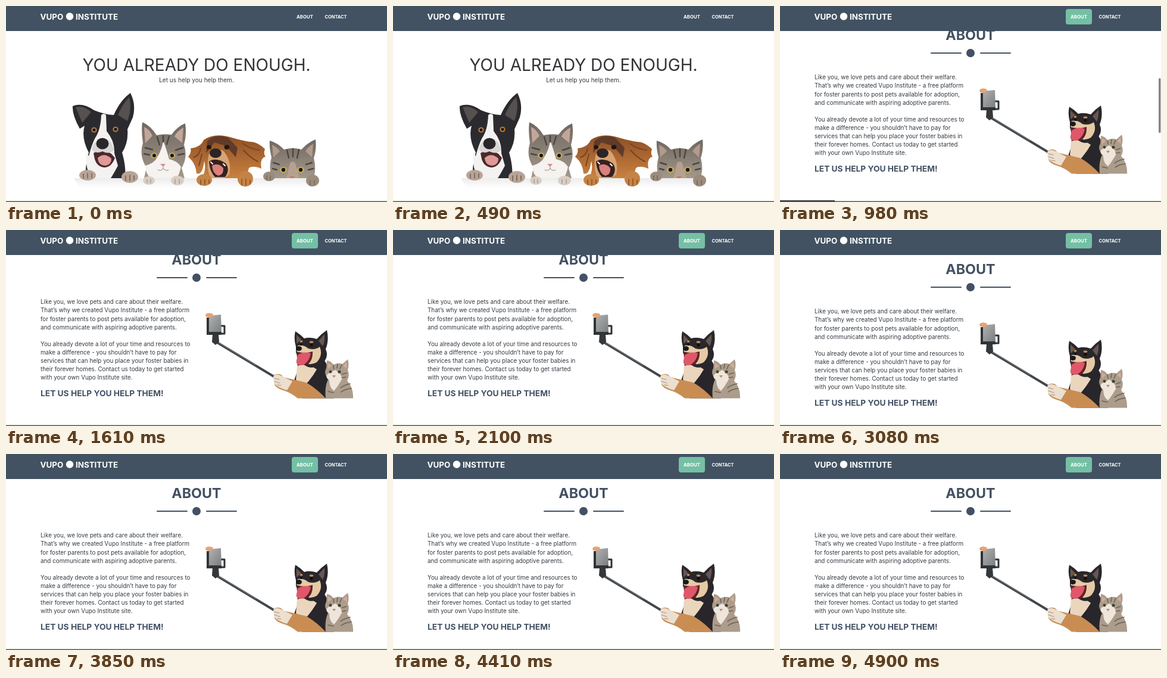
Animation, 640 px wide and 329 px high, one loop 4.97 s. Source, as an HTML page:

```html
<!DOCTYPE html>
<html lang="en">
<head>
<meta charset="utf-8">
<title>Pet adoption page</title>
<style>
  html, body { margin: 0; width: 100%; height: 100%; overflow: hidden; background: #fff; }
  svg { display: block; width: 640px; height: 329px; font-family: Inter, "Open Sans", sans-serif; font-optical-sizing: none; }
  .mid { text-anchor: middle; }
  .bold { font-weight: 700; }
  .slate { fill: #425163; }
  .copy { font-size: 9.85px; fill: #343a40; }
  .line { fill: none; stroke-linecap: round; stroke-linejoin: round; }
</style>
</head>
<body>
<svg viewBox="0 0 640 329">
  <defs>
    <linearGradient id="shelf" x2="0" y2="1">
      <stop stop-color="#ececec"/><stop offset="1" stop-color="#fff"/>
    </linearGradient>
    <linearGradient id="tabby" x2="0" y2="1">
      <stop stop-color="#6f675f"/><stop offset="1" stop-color="#a3988c"/>
    </linearGradient>
    <linearGradient id="gold" x2="0" y2="1">
      <stop stop-color="#8d4f25"/><stop offset="1" stop-color="#c9813f"/>
    </linearGradient>
    <linearGradient id="phone" x2="1" y2="1">
      <stop stop-color="#b4b5b5"/><stop offset="1" stop-color="#777a7c"/>
    </linearGradient>
  </defs>

  <g id="hero">
    <text class="mid" x="320" y="109" font-size="28" fill="#333437">YOU ALREADY DO ENOUGH.</text>
    <text class="mid" x="320" y="127.5" font-size="10.1" fill="#343a40">Let us help you help them.</text>
    <path d="M114 289H522L518 306H124Z" fill="url(#shelf)"/>

    <g id="collie">
      <path d="M133 289Q134 262 139 246Q126 221 132 201L124 206Q111 183 112 168Q128 161 148 175Q165 182 181 183Q192 158 209 146Q219 166 213 187L204 207Q206 229 195 246Q202 270 200 289Z" fill="#2b2b2f"/>
      <path d="M117 170Q130 166 143 178L128 196ZM188 183Q196 164 207 153Q212 172 204 193Z" fill="#56504f"/>
      <path d="M160 183Q164 179 168 183L169 210Q183 227 182 247L188 268Q180 283 176 289H146Q132 277 135 244L139 252Q144 232 150 221Q159 208 160 183Z" fill="#f4f2f1"/>
      <path d="M147 247Q160 238 177 248L183 255Q177 271 165 271Q153 270 149 257Z" fill="#4a2a2b"/>
      <path d="M154 255Q165 245 177 256Q177 267 166 268Q155 267 154 255Z" fill="#df9a98"/>
      <path d="M144 241Q151 249 162 244Q174 250 181 242Q178 222 163 223Q148 223 144 241Z" fill="#d9d6d5"/>
      <ellipse cx="162" cy="231" rx="10.5" ry="9.5" fill="#29272a"/>
      <g fill="#b87a40"><circle cx="148" cy="208" r="4.6"/><circle cx="184" cy="207" r="4.6"/></g>
      <g fill="#141414"><circle cx="148" cy="208" r="2.5"/><circle cx="184" cy="207" r="2.5"/></g>
      <g fill="#b8a497"><ellipse cx="137" cy="284" rx="14" ry="9"/><ellipse cx="208" cy="287" rx="14" ry="10"/></g>
      <path class="line" d="M130 282v7m7-8v8m7-8v7M201 285v8m7-9v9m7-8v7" stroke="#715d52" stroke-width="1.5"/>
    </g>

    <g id="whitecat">
      <path d="M232 289L236 271Q223 252 230 230Q227 210 229 195Q243 201 253 217Q264 214 278 216Q288 202 301 197Q304 216 299 233Q306 253 295 272L300 289Z" fill="url(#tabby)"/>
      <path d="M232 203Q242 208 246 218L234 230ZM298 204Q287 210 283 219L296 230Z" fill="#c3a69b"/>
      <path d="M264 225Q269 239 274 257Q288 260 294 270Q291 284 286 289H243Q234 281 234 268Q249 264 254 254Q263 239 264 225Z" fill="#f5f2ef"/>
      <path class="line" d="M254 220l4 13m6-15v10m10-9l-4 13M234 238l12 3m-14 7l9 2M297 238l-12 4m14 6l-10 2" stroke="#494540" stroke-width="2.4"/>
      <g fill="#c6a55c"><ellipse cx="249" cy="251" rx="5.5" ry="5"/><ellipse cx="279" cy="251" rx="5.5" ry="5"/></g>
      <g fill="#171717"><circle cx="249" cy="251" r="3"/><circle cx="279" cy="251" r="3"/></g>
      <path d="M259 265h9l-4 5Z" fill="#d48e88"/>
      <path class="line" d="M264 270v3q-5 5-9 2m9-2q5 5 9 2" stroke="#958680"/>
      <g fill="#d9cec4"><ellipse cx="240" cy="293" rx="10" ry="7"/><ellipse cx="288" cy="293" rx="11" ry="8"/></g>
      <path class="line" d="M237 291v6m6-6v6M284 291v7m7-7v7" stroke="#8f8175"/>
    </g>

    <g id="spaniel">
      <path d="M329 289Q337 275 333 260Q330 285 320 281Q319 264 306 253Q312 246 310 239Q327 237 332 225Q351 211 383 222Q398 226 410 228Q421 227 435 240Q432 249 436 253Q426 255 429 273Q414 267 408 272L403 289Z" fill="url(#gold)"/>
      <path d="M338 227Q351 214 373 221L389 238L386 254L370 235L350 229L336 247Z" fill="#603b28"/>
      <path d="M341 248Q351 235 366 244Q380 262 375 283L367 289H344Q335 273 341 248Z" fill="#d8a474"/>
      <path d="M341 261Q352 253 369 264Q377 275 368 287H351Q342 277 341 261Z" fill="#38201f"/>
      <path d="M346 268Q356 262 365 272Q366 283 357 285Q347 282 346 268Z" fill="#d9817c"/>
      <path class="line" d="M344 262l3 3m18 0l3 3" stroke="#fff" stroke-width="2"/>
      <ellipse cx="352" cy="247" rx="10" ry="8" fill="#2b2527"/>
      <g fill="#24160f"><ellipse cx="341" cy="237" rx="4" ry="3.5"/><ellipse cx="371" cy="237" rx="4.4" ry="3.8"/></g>
      <path class="line" d="M398 231q12 9 28 11m-27 0q10 12 24 19M327 239q-2 12-12 15m14-5l-5 19" stroke="#7c431f" stroke-width="2"/>
      <g fill="#c48346"><ellipse cx="333" cy="292" rx="13" ry="10"/><ellipse cx="402" cy="290" rx="13" ry="13"/></g>
      <path class="line" d="M327 292v8m7-9v9m7-8v6M396 291v10m7-11v11m7-9v7" stroke="#7d4720" stroke-width="1.3"/>
    </g>

    <g id="greycat">
      <path d="M446 289Q441 270 446 254Q442 239 443 226Q457 230 467 241Q482 236 496 241Q507 229 520 224Q522 241 517 255Q522 275 516 289Z" fill="url(#tabby)"/>
      <path d="M447 233Q456 237 460 244L449 254ZM516 231Q507 237 503 244L514 254Z" fill="#b29a8d"/>
      <path class="line" d="M472 242l3 13m7-15v13m10-12l-3 14M449 263l10 3m-11 7l7 2M514 263l-10 3m12 7l-8 2" stroke="#4b463f" stroke-width="2.4"/>
      <path d="M477 264Q482 258 486 264L493 289H471Z" fill="#b6a18e"/>
      <g fill="#c9a955"><ellipse cx="466" cy="275" rx="6" ry="5.3"/><ellipse cx="495" cy="275" rx="6" ry="5.3"/></g>
      <g fill="#161616"><circle cx="466" cy="275" r="3.2"/><circle cx="495" cy="275" r="3.2"/></g>
      <path d="M476 286h9l-3 3h-3Z" fill="#b8776a"/>
      <g fill="#9c8b7b"><ellipse cx="442" cy="286" rx="10" ry="8"/><ellipse cx="515" cy="293" rx="11" ry="10"/></g>
      <path class="line" d="M438 285v7m6-7v7M511 293v8m7-8v7" stroke="#5f544b"/>
    </g>
  </g>

  <g id="about">
    <text class="mid bold slate" x="320" y="74.3" font-size="23.3">ABOUT</text>
    <path class="line" d="M254 96H304M337 96H387" stroke="#425163" stroke-width="2"/>
    <circle class="slate" cx="320" cy="96" r="7"/>
    <g id="copy" class="copy"></g>
    <text class="bold slate" x="58" y="294.5" font-size="13.75">LET US HELP YOU HELP THEM!</text>

    <g id="selfie">
      <path class="line" d="M355 205L450 262" stroke="#42474c" stroke-width="4"/>
      <path class="line" d="M357 205L420 243" stroke="#777c80"/>
      <path d="M347 191H357L358 204L352 209L346 204Z" fill="#34383b"/>
      <path class="line" d="M360 177h7v13h-7" stroke="#2e3234" stroke-width="3"/>
      <path d="M340 160L361 158L362 190L338 191Z" fill="url(#phone)"/>
      <path d="M337 163H341V187H362V192H337Z" fill="#303437"/>
      <path d="M335 158Q339 153 348 157L346 162H336Z" fill="#e8a271"/>

      <path d="M498 298.500Q487 290 479 283L490 251Q488 239 494 225L524 223Q549 243 551 298.500Z" fill="#28262a"/>
      <path d="M489 244Q506 238 522 250Q513 266 499 280L487 267Z" fill="#ead6bd"/>
      <path d="M451 259Q461 255 466 263L504 272Q520 281 537 298.500H490Q477 288 465 285Q453 281 451 275Z" fill="#c98d54"/>
      <path d="M449 262Q453 256 463 261L481 270L472 285Q457 281 450 273Z" fill="#ebdfd0"/>
      <path class="line" d="M451 265l8 2m-8 3l9 3m-4 3l6 1" stroke="#a78b72"/>
      <path d="M487 212Q483 198 486 186Q494 191 501 198Q510 195 522 199Q530 190 539 184Q543 201 537 216Q544 232 527 243Q511 252 498 240L487 222Z" fill="#29272b"/>
      <path d="M488 192L496 200L488 207ZM535 191Q536 204 532 211L525 202Z" fill="#675652"/>
      <path d="M490 210Q499 208 508 215Q519 218 527 212Q533 226 522 238Q510 245 500 237L488 222Z" fill="#e6caa6"/>
      <path d="M488 220Q500 224 515 220Q516 236 505 243Q493 243 489 231Z" fill="#5b2427"/>
      <path d="M490 226Q500 219 512 223Q510 237 498 243Q486 244 488 235Z" fill="#e0576a"/>
      <ellipse cx="492" cy="215" rx="5" ry="4" fill="#1b1a1d"/>
      <g fill="#c98d54"><ellipse cx="496" cy="203" rx="2.5" ry="1.7"/><ellipse cx="513" cy="204" rx="3.4" ry="1.8"/></g>
      <g fill="#130f0f"><circle cx="496" cy="208" r="2"/><circle cx="513" cy="209" r="2.6"/></g>

      <path d="M537 298.500Q535 279 541 267Q533 256 538 248L539 235Q546 236 550 242Q559 238 565 241L574 233Q577 242 574 251Q578 260 573 269Q584 281 583 298.500Z" fill="#ac9c8b"/>
      <path d="M541 239L547 244L541 249ZM572 238L573 248L566 244Z" fill="#d2ac9c"/>
      <path d="M553 251Q561 255 565 265Q558 278 551 286Q543 281 543 268Q536 263 540 258Z" fill="#eee5db"/>
      <path class="line" d="M550 243l1 6m6-8l-1 7m8-6l-3 7M572 256l-7 2m6 5l-7 1M578 274q-10 2-16 7m18 1q-11 1-17 6m-22-1l9 2" stroke="#6e6257" stroke-width="1.6"/>
      <g fill="#41422d"><circle cx="545" cy="254" r="2.4"/><circle cx="560" cy="254" r="2.6"/></g>
      <path d="M548 260h6l-3 4Z" fill="#c97f77"/>
    </g>
  </g>

  <rect width="640" height="42" fill="#425262"/>
  <g class="bold" fill="#fff">
    <text x="57.500" y="22.500" font-size="13.4">VUPO</text>
    <circle cx="107" cy="17.500" r="6.2"/>
    <text x="117" y="22.500" font-size="13.4">INSTITUTE</text>
    <rect id="tab" x="480" y="5" width="44" height="26" rx="4" fill="#74c0a5"/>
    <text class="mid" x="502" y="20.500" font-size="7.8">ABOUT</text>
    <text class="mid" x="554" y="20.500" font-size="7.5">CONTACT</text>
  </g>
  <rect id="thumb" x="636" width="3.500" height="92" rx="1.750" fill="#858585"/>
  <rect y="327.500" width="640" height="1.500" fill="#16801f"/>
  <rect id="status" y="326" width="92" height="2.500" fill="#454b47"/>
</svg>
<script>
const LOOP = 4970, TICK = 70, ABOUT_TOP = 415;
const $ = id => document.getElementById(id);

const lines = [
  'Like you, we love pets and care about their welfare.',
  'That’s why we created Vupo Institute - a free platform',
  'for foster parents to post pets available for adoption,',
  'and communicate with aspiring adoptive parents.',
  '',
  'You already devote a lot of your time and resources to',
  'make a difference - you shouldn’t have to pay for',
  'services that can help you place your foster babies in',
  'their forever homes. Contact us today to get started',
  'with your own Vupo Institute site.'
];
$('copy').innerHTML = lines
  .map((s, i) => `<text x="58" y="${(140.3 + 14.1 * i).toFixed(1)}">${s}</text>`).join('');

// Scroll moves: start, end, from, to
const moves = [
  [560, 980, 0, 432],
  [980, 1050, 432, 431],
  [2100, 2380, 431, 415]
];
const ease = p => p < .5 ? 4 * p ** 3 : 1 - 4 * (1 - p) ** 3;

function scrollAt(t) {
  let y = 0;
  for (const [start, end, from, to] of moves) {
    if (t >= start) y = from + (to - from) * ease(Math.min(1, (t - start) / (end - start)));
  }
  return Math.round(y);
}

const during = (t, a, b) => t >= a && t < b;
const show = (id, on) => $(id).setAttribute('visibility', on ? 'visible' : 'hidden');
const shift = (id, y) => $(id).setAttribute('transform', `translate(0 ${y})`);

function draw(now) {
  const t = Math.floor(now % LOOP / TICK) * TICK;
  const y = scrollAt(t);
  shift('hero', -y);
  shift('about', ABOUT_TOP - y);
  $('thumb').setAttribute('y', (y * .28).toFixed(1));
  show('thumb', during(t, 630, 1540) || during(t, 2170, 2870));
  show('tab', t >= 700);
  show('status', during(t, 630, 1400));
}

const begin = performance.now();
function loop() {
  draw(performance.now() - begin);
  requestAnimationFrame(loop);
}
loop();
</script>
</body>
</html>
```
